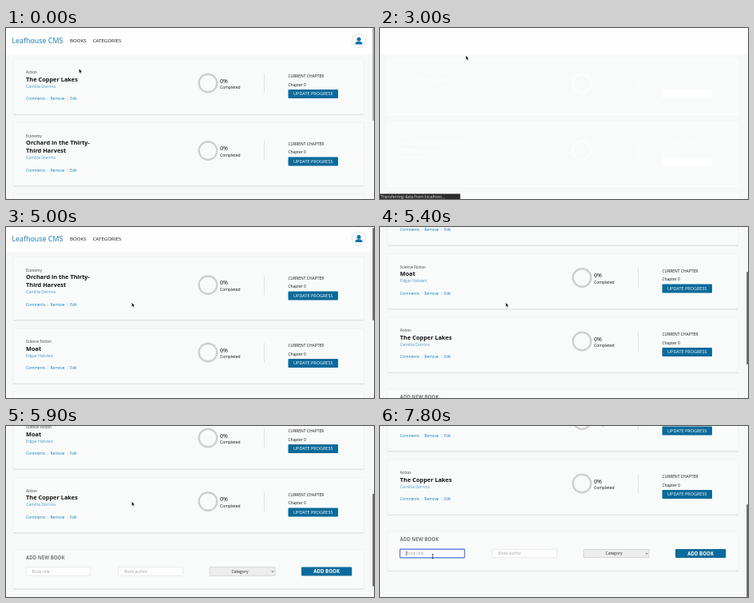
Recreate the animation shown at these times as an HTML page. Size 461x214 px, loop 8000 ms.

```html
<!DOCTYPE html>
<html lang="en">
<head>
<meta charset="utf-8">
<title>Book list</title>
<style>
  html, body { margin: 0; width: 100%; height: 100%; overflow: hidden; background: #f7f9f8; }
  svg { display: block; width: 100%; height: 100%; }
  text { font-family: "Open Sans", "Noto Sans", sans-serif; white-space: pre; }
  .ghost text, .ghost .btn { fill: #fdfefd; }
  .ghost .ring, .ghost .rule, .ghost .card { stroke: #fefefe; }
  .ghost .edge { fill: #fefefe; }
</style>
</head>
<body>
<svg id="stage" viewBox="0 0 461 214" xmlns="http://www.w3.org/2000/svg">
  <rect width="461" height="214" fill="#f7f9f8"/>
  <g id="page">
    <rect width="461" height="33" fill="#fefefe"/>
    <g id="header"></g>
    <g id="before"></g>
    <g id="after"></g>
    <g id="form"></g>
  </g>
  <rect id="bar" x="459.3" width="1.7" height="116" rx=".8"/>
  <g id="status">
    <rect y="207.5" width="100.5" height="6.5" fill="#2b2b2b"/>
    <text x="1" y="212.9" font-size="5.1" fill="#e8e8e8">Transferring data from localhost…</text>
  </g>
  <path id="arrow" d="M0 0V5.4L1.3 4.3 2.2 6.3 3.1 5.9 2.2 4 3.9 3.9Z" fill="#111" stroke="#fff" stroke-width=".35"/>
  <path id="beam" d="M-1.1-2.5H1.1M0-2.5V2.5M-1.1 2.5H1.1" fill="none" stroke="#222" stroke-width=".7"/>
</svg>
<script>
const $ = id => document.getElementById(id);
const BLUE = '#0b6a9b', LINK = '#1580bd', INK = '#121212';
const LOOP = 8000, STEP = 100, TOP = 39, GAP = 10.2;

const text = (x, y, size, fill, str, weight = 400, extra = '') =>
  `<text x="${x}" y="${y}" font-size="${size}" fill="${fill}" font-weight="${weight}" ${extra}>${str}</text>`;
const middle = 'text-anchor="middle"';

const panel = (y, h) =>
  `<rect class="card" x="9.5" y="${y}" width="439" height="${h}" rx="1" fill="#f9fbfa" stroke="#eceeed" stroke-width=".7"/>
   <rect class="edge" x="9.5" y="${y + h - .6}" width="439" height="1.2" fill="#dfe1e0"/>`;

const button = (x, y, w, h, size, label, weight) =>
  `<rect class="btn" x="${x}" y="${y}" width="${w}" height="${h}" rx="1" fill="${BLUE}"/>` +
  text(x + w / 2, y + h / 2 + size * .36, size, '#fff', label, weight, middle);

const cardHeight = book => 59.3 + 10 * book.title.length;

function card(book, y) {
  const h = cardHeight(book), extra = 10 * (book.title.length - 1), m = y + extra / 2;
  let s = panel(y, h) + text(25, y + 18.4, 4.5, '#666', book.genre, 600);
  book.title.forEach((line, i) => s += text(25, y + 27.6 + 10 * i, 7.4, INK, line, 700));
  s += text(25, y + 35.7 + extra, 5.2, '#3d95c9', book.author);
  [[25, 'Comments'], [55.5, 'Remove'], [80.3, 'Edit']].forEach(([x, label]) =>
    s += text(x, y + 51.3 + extra, 4.8, LINK, label));
  [52.4, 77.4].forEach(x =>
    s += `<path class="rule" d="M${x} ${y + 47.4 + extra}v4.4" stroke="#d5d5d5" stroke-width=".6"/>`);
  return s +
    `<circle class="ring" cx="253" cy="${m + 30}" r="11.3" fill="none" stroke="#cfcfcf" stroke-width="2.4"/>
     <path class="rule" d="M323.5 ${m + 18}v24.5" stroke="#dedede" stroke-width=".8"/>` +
    text(268, m + 29.6, 7.2, INK, '0%') +
    text(268, m + 37.2, 5, INK, 'Completed') +
    text(353.5, m + 23.4, 4.95, INK, 'CURRENT CHAPTER') +
    text(353.5, m + 33.8, 4.9, INK, 'Chapter 0') +
    button(353.5, m + 38, 62.5, 11, 5.5, 'UPDATE PROGRESS', 400);
}

function list(books) {
  let y = TOP;
  return books.map(book => {
    const s = card(book, y);
    y += cardHeight(book) + GAP;
    return s;
  }).join('');
}

const action = { genre: 'Action', title: ['The Copper Lakes'], author: 'Camilla Dorrins' };
const economy = { genre: 'Economy', title: ['Orchard in the Thirty-', 'Third Harvest'], author: 'Camilla Dorrins' };
const scifi = { genre: 'Science Fiction', title: ['Moat'], author: 'Edgar Halsten' };

$('header').innerHTML =
  text(7.5, 19.4, 8.9, '#1079b4', 'Leafhouse CMS') +
  text(80, 18.4, 6.15, INK, 'BOOKS') +
  text(108.7, 18.4, 6.15, INK, 'CATEGORIES') +
  `<circle cx="442" cy="16.2" r="8.6" fill="#fff" stroke="#d9dcde" stroke-width=".8"/>
   <circle cx="442" cy="14" r="2.5" fill="#0d73ad"/>
   <path d="M437.4 20.6C437.4 17.6 439.4 16.8 442 16.8S446.6 17.6 446.6 20.6Z" fill="#0d73ad"/>`;
$('before').innerHTML = list([action, economy, scifi]);
$('after').innerHTML = list([economy, scifi, action]);

const field = (x, label, id) =>
  `<rect id="${id}" x="${x}" y="320.2" width="81" height="10.6" rx=".8" fill="#fcfdfc" stroke="#e2e4e3" stroke-width=".7"/>` +
  text(x + 7.5, 327.3, 5, '#a2a5a4', label);
$('form').innerHTML = panel(298, 49.5) +
  text(25, 310.4, 6.1, '#777', 'ADD NEW BOOK', 700) +
  field(25, 'Book title', 'titleBox') + field(140.7, 'Book author', 'authorBox') +
  `<path id="caret" d="M33 322.5v6" stroke="#222" stroke-width=".6"/>
   <rect x="255" y="320.3" width="82" height="10.4" fill="#ededed" stroke="#c4c4c4" stroke-width=".6"/>
   <path d="M332.8 324.9l1.2 1.4 1.2-1.4" fill="none" stroke="#333" stroke-width=".7"/>` +
  text(293, 327.3, 5, '#222', 'Category', 400, middle) +
  button(370, 320, 63.3, 11, 6.1, 'ADD BOOK', 700);

// Each key: [time, value, value...]
const scrollKeys = [[4900, 0], [5000, 1.5], [5200, 45], [5400, 95], [5600, 125],
  [5800, 140], [5900, 143.5], [6000, 152], [6200, 166]];
const pointerKeys = [[2700, 152, 2], [2900, 147, 13], [3000, 107.5, 34.5], [4200, 107.5, 34.5],
  [4700, 157.5, 94.5], [6500, 157.5, 94.5], [6900, 112, 130], [7300, 66, 163]];

function at(keys, t) {
  if (t <= keys[0][0]) return keys[0].slice(1);
  const i = keys.findIndex(k => k[0] >= t);
  if (i < 0) return keys[keys.length - 1].slice(1);
  const a = keys[i - 1], b = keys[i], p = (t - a[0]) / (b[0] - a[0]);
  return a.slice(1).map((v, n) => v + (b[n + 1] - v) * p);
}

const show = (id, on) => $(id).setAttribute('visibility', on ? 'visible' : 'hidden');
const move = (id, x, y) => $(id).setAttribute('transform', `translate(${x} ${y})`);

function draw(time) {
  const t = Math.floor((time % LOOP) / STEP) * STEP;
  const blank = t >= 2800 && t < 3400, loaded = t >= 3400;
  const [scroll] = at(scrollKeys, t);

  move('page', 0, -scroll);
  show('header', t < 2800 || t >= 3200);
  show('before', !loaded);
  show('after', loaded);
  show('form', loaded);
  $('before').setAttribute('class', blank ? 'ghost' : '');
  show('status', t >= 2900 && t < 3200);

  show('bar', !blank);
  $('bar').setAttribute('y', scroll * 98 / 166);
  $('bar').setAttribute('fill', t < 1100 ? '#a3a3a3' : '#626262');

  const focus = t >= 7800;
  $('titleBox').setAttribute('stroke', focus ? '#4a6fe0' : '#e2e4e3');
  $('titleBox').setAttribute('stroke-width', focus ? 1.2 : .7);
  show('caret', focus);

  const [x, y] = t < 600 ? [91.5, 51] : at(pointerKeys, t);
  const typing = loaded && x < 106 && y > 154;
  show('arrow', (t < 600 || t >= 2700) && !typing);
  show('beam', typing);
  move('arrow', x, y);
  move('beam', x, y);
}

const start = performance.now();
function tick() {
  draw(performance.now() - start);
  requestAnimationFrame(tick);
}
tick();
</script>
</body>
</html>
```
